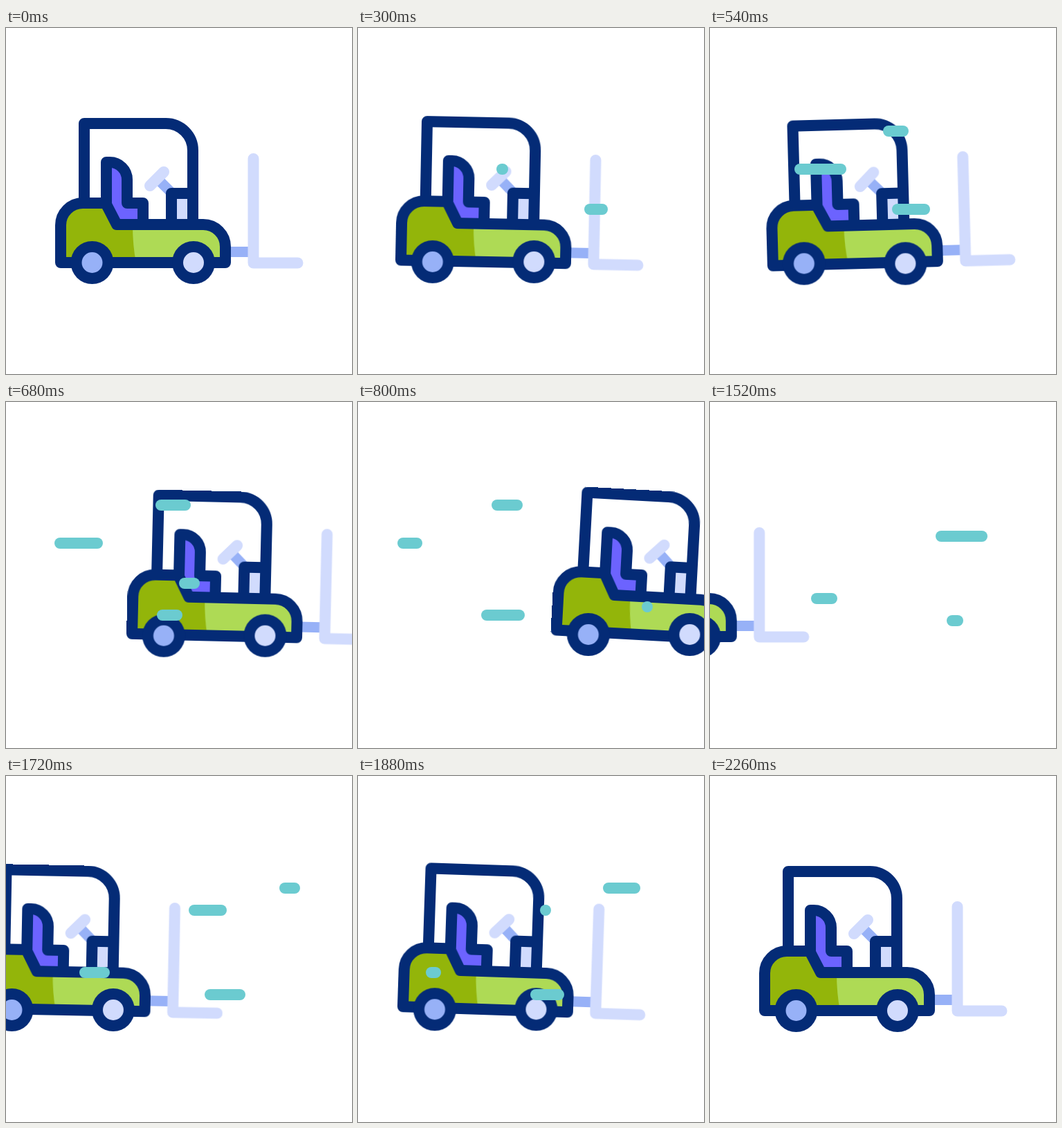
These frames come from a looping animation (500 by 500 pixels, 2.32 s). An HTML page:

```html
<!DOCTYPE html>
<html lang="en">
<head>
<meta charset="utf-8">
<title>Forklift</title>
<style>
  :root {
    --loop: 2320ms;
    --ease: cubic-bezier(.333, 0, .667, 1);
    --navy: #042b76;
    --pale: #d1dbfd;
    --blue: #97b1f7;
  }
  html, body { margin: 0; width: 100%; height: 100%; overflow: hidden; background: #fff; }
  .stage { position: absolute; inset: 0; width: 500px; height: 500px; overflow: hidden; }
  svg { position: absolute; inset: 0; display: block; }

  .outline { fill: none; stroke: var(--navy); stroke-width: 16; stroke-linecap: round; stroke-linejoin: round; }
  .pale { fill: none; stroke: var(--pale); stroke-width: 16; stroke-linecap: round; stroke-linejoin: round; }
  .blue { fill: none; stroke: var(--blue); stroke-width: 15; }

  .car { animation: drive var(--loop) var(--ease) infinite; }
  .bob { animation: bob var(--loop) var(--ease) infinite; }
  .body { transform-origin: 198px 322px; animation: tilt var(--loop) var(--ease) infinite; }

  /* back up, speed off to the right, return from the left, overshoot, settle */
  @keyframes drive {
    0%, 4.31% { transform: translateX(0); }
    14.655% { transform: translateX(-18px); animation-timing-function: cubic-bezier(.333, 0, .667, .034); }
    23.276% { transform: translateX(11px); animation-timing-function: cubic-bezier(.333, .249, .667, .585); }
    26.724% { transform: translateX(56px); animation-timing-function: cubic-bezier(.333, .277, .667, .663); }
    34.483% { transform: translateX(207.5px); animation-timing-function: cubic-bezier(.333, .371, .667, .686); }
    44.828% { transform: translateX(390.5px); animation-timing-function: linear; }
    50% { transform: translateX(475px); animation-timing-function: step-end; }
    54.31% { transform: translateX(-475px); animation-timing-function: cubic-bezier(.333, .321, .667, .642); }
    65.517% { transform: translateX(-287px); animation-timing-function: cubic-bezier(.333, .316, .667, .724); }
    77.586% { transform: translateX(-56px); animation-timing-function: cubic-bezier(.333, .432, .667, .733); }
    81.034% { transform: translateX(-14px); animation-timing-function: cubic-bezier(.333, .933, .667, 1); }
    89.655% { transform: translateX(16px); }
    97.414%, 100% { transform: translateX(0); }
  }
  @keyframes tilt {
    0%, 4.31%, 50%, 65.517%, 97.414%, 100% { transform: rotate(0deg); }
    12.93% { transform: rotate(1.15deg); }
    21.98% { transform: rotate(-1.7deg); }
    34.483% { transform: rotate(3.1deg); }
    81.034% { transform: rotate(1.9deg); }
    89.655% { transform: rotate(-.8deg); }
  }
  @keyframes bob {
    0%, 4.31%, 50%, 65.517%, 97.414%, 100% { transform: translateY(0); }
    12.93% { transform: translateY(-1.15px); }
    21.98% { transform: translateY(1.5px); }
    34.483% { transform: translateY(-3px); }
    81.034% { transform: translateY(-1.8px); }
    89.655% { transform: translateY(.8px); }
  }

  /* wind streaks: the left end runs ahead, the right end follows */
  .track { position: absolute; height: 16px; }
  .track i {
    position: absolute; top: 0; bottom: 0; border-radius: 8px; background: #6bcbd0;
    animation:
      head var(--loop) var(--ease) infinite,
      tail var(--loop) var(--ease) infinite,
      show var(--loop) step-end infinite;
    animation-delay: calc((var(--t) - 2320) * 1ms);
  }
  @keyframes head {
    0% { left: calc(100% - 16px); }
    21.12%, 100% { left: 0; }
  }
  @keyframes tail {
    0%, 6.25% { right: 0; }
    27.37%, 100% { right: calc(100% - 16px); }
  }
  @keyframes show {
    0% { opacity: 1; }
    27.37%, 100% { opacity: 0; }
  }
</style>
</head>
<body>
<div class="stage">
  <svg width="500" height="500" viewBox="0 0 500 500">
    <g class="car"><g class="bob">
      <g class="body">
        <path class="blue" d="M318 323.5H352M217 216L243 242"/>
        <path class="pale" d="M357.5 189V339.5H421.5M208 228L228 208"/>
        <path fill="#6c63ff" d="M145 194H150A25 25 0 0 1 175 219V253H198V284H160L145 253Z"/>
        <path fill="#d1dbfd" d="M239 239H270V284H239Z"/>
        <path fill="#93b50a" d="M79 339V285A32 32 0 0 1 111 253H144L160 284H200V339Z"/>
        <path fill="#aeda55" d="M183 284H285A32 32 0 0 1 317 316V339H188Q183 315 183 284Z"/>
        <path class="outline" d="M113 253V138H231A39 39 0 0 1 270 177V284M270 239H239V284"/>
        <path class="outline" d="M145 253V194H150A25 25 0 0 1 175 219V253H198V284"/>
        <path class="outline" d="M79 339V285A32 32 0 0 1 111 253H144L160 284H285A32 32 0 0 1 317 316V339Z"/>
      </g>
      <g fill="#042b76">
        <circle cx="124.5" cy="339" r="31"/>
        <circle cx="271" cy="339" r="31"/>
      </g>
      <circle cx="124.5" cy="339" r="15" fill="#97b1f7"/>
      <circle cx="271" cy="339" r="15" fill="#d1dbfd"/>
    </g></g>
  </svg>

  <div class="track" style="left:250px;top:254px;width:111px;--t:165"><i></i></div>
  <div class="track" style="left:57px;top:196px;width:160px;--t:280"><i></i></div>
  <div class="track" style="left:189px;top:141px;width:98px;--t:378"><i></i></div>
  <div class="track" style="left:121px;top:300px;width:134px;--t:550"><i></i></div>
  <div class="track" style="left:308px;top:288px;width:118px;--t:785"><i></i></div>
  <div class="track" style="left:263px;top:186px;width:160px;--t:1255"><i></i></div>
  <div class="track" style="left:98px;top:276px;width:88px;--t:1330"><i></i></div>
  <div class="track" style="left:246px;top:308px;width:120px;--t:1440"><i></i></div>
  <div class="track" style="left:318px;top:154px;width:107px;--t:1600"><i></i></div>
</div>
</body>
</html>
```
